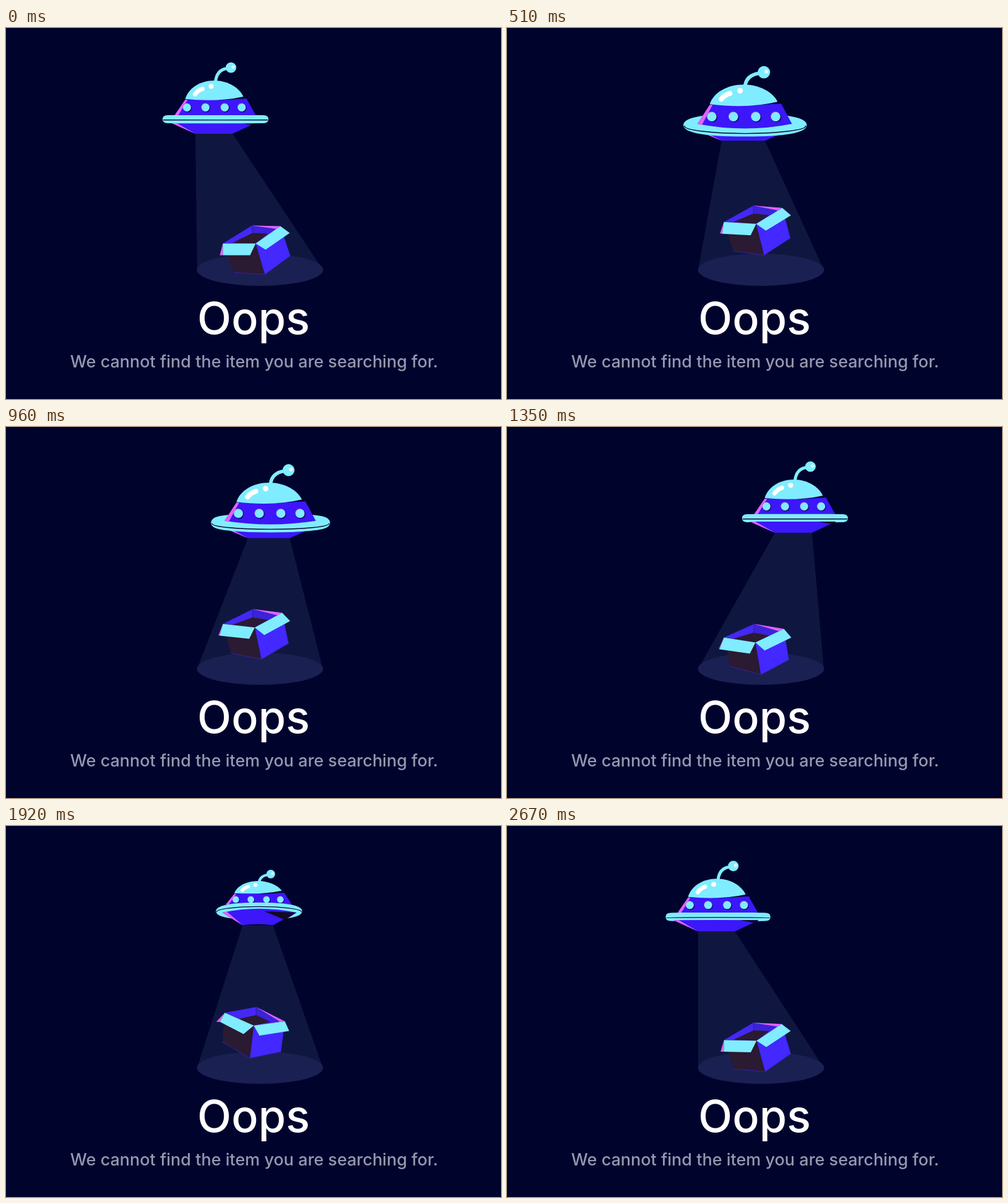
An HTML page with a canvas that plays this animation: 800x600 px, repeating every 2700 ms.

```html
<!DOCTYPE html>
<html lang="en">
<head>
<meta charset="utf-8">
<title>Oops</title>
<style>
  html, body { margin: 0; height: 100%; overflow: hidden; background: #00042d; }
  canvas { position: absolute; left: 0; top: 0; }
  h1, p {
    position: absolute; left: 0; width: 800px; margin: 0; text-align: center;
    white-space: nowrap; line-height: 1; font-family: Inter, sans-serif; font-weight: 500;
  }
  h1 { top: 433px; font-size: 72px; color: #fff; }
  p { top: 526px; left: 1px; font-size: 27px; color: #9698b0; }
</style>
</head>
<body>
<canvas width="800" height="600"></canvas>
<h1>Oops</h1>
<p>We cannot find the item you are searching for.</p>
<script>
const ctx = document.querySelector('canvas').getContext('2d');
const LOOP = 2700, QUARTER = LOOP / 4;
const CYAN = '#80ecff', BLUE = '#3b17fa', PINK = '#e063f6', INK = '#05062c';
const BROWN = '#2a1a32', SHADE = '#120a26';

// Box corners relative to the near top corner, in three poses.
const POSES = {
  bottom:    [[15, 50], [9, 52], [-9, 53]],
  rightFoot: [[56, 20], [54, 28], [42, 45]],
  leftFoot:  [[-35, 47], [-40, 39], [-53, 24]],
  back:      [[-6, -29], [-2, -30], [5, -30]],
  left:      [[-53, 0], [-51, -8], [-46, -23]],
  right:     [[40, -28], [46, -22], [51, -4]],
  flapR1:    [[55, -17], [58, -8], [57, 12]],
  flapR2:    [[16, 10], [15, 13], [8, 17]],
  flapL1:    [[-9, 19], [-9, 18], [-18, 13]],
  flapL2:    [[-53, 19], [-58, 11], [-54, -9]],
  flapTip:   [[-58, 19], [-59, 10], [-61, -9]],
  floorL:    [[-38, -1], [-36, -6], [-25, -11]],
  floorB:    [[-5, -17], [-3, -16], [5, -17]],
  floorR:    [[20, -16], [23, -11], [28, -5]]
};

const lerp = (a, b, k) => a + (b - a) * k;
const mix = (a, b, k) => [lerp(a[0], b[0], k), lerp(a[1], b[1], k)];

// Linear interpolation through evenly spaced keys that wrap around.
function keyed(t, keys) {
  const q = t / QUARTER, i = Math.floor(q) % 4;
  return lerp(keys[i], keys[(i + 1) % 4], q % 1);
}

function shape(color, path) {
  ctx.fillStyle = color;
  ctx.fill(new Path2D(path));
}

function poly(color, ...points) {
  shape(color, 'M' + points.join('L') + 'Z');
}

function line(color, width, path) {
  ctx.strokeStyle = color;
  ctx.lineWidth = width;
  ctx.stroke(new Path2D(path));
}

function dot(color, x, y, r) {
  ctx.fillStyle = color;
  ctx.beginPath();
  ctx.arc(x, y, r, 0, 7);
  ctx.fill();
}

function drawBeam({ X, hullY }) {
  poly('#0f1740', [X(-32.5), hullY], [X(27.5), hullY], [512, 391], [309, 391]);
  ctx.fillStyle = '#1a2051';
  ctx.beginPath();
  ctx.ellipse(410.5, 391, 102, 26, 0, 0, 7);
  ctx.fill();
}

function drawBox(t) {
  const x = keyed(t, [403.5, 402.5, 401.5, 400.3]), y = keyed(t, [348.5, 306.5, 348.5, 318]);
  const c = {}, near = [0, 0];
  for (const [name, [a, b, d]] of Object.entries(POSES)) {
    c[name] = t < 2 * QUARTER ? mix(a, b, t / (2 * QUARTER))
      : t < 3 * QUARTER ? mix(b, d, t / QUARTER - 2) : mix(d, a, t / QUARTER - 3);
  }
  ctx.save();
  ctx.translate(x, y);
  poly('#4428f4', c.left, c.back, c.right, near);
  poly('#3c22da', c.back, c.right, c.floorR, c.floorB);
  poly(BROWN, near, c.floorL, c.floorB, c.floorR);
  line('#2c1a9c', 1, `M${c.back}L${c.floorB}`);
  poly(PINK, c.back, c.right, mix(c.right, near, .45), mix(c.right, c.floorR, .35));
  poly(BROWN, near, c.bottom, c.leftFoot, c.left);
  poly('#4328ff', near, c.bottom, c.rightFoot, c.right);
  line('#3a20a8', 1, `M${c.leftFoot}L${c.bottom}L${c.rightFoot}`);
  poly(PINK, c.left, c.flapTip, c.flapL2);
  poly(CYAN, c.left, near, c.flapL1, c.flapL2);
  poly(CYAN, near, c.right, c.flapR1, c.flapR2);
  ctx.restore();
}

// tilt runs from 1 (near, seen from above) to -1 (far, seen from below).
function ufoPose(t) {
  const tilt = keyed(t, [0, 1, 0, -1]);
  const cx = keyed(t, [338.5, 399.6, 465.5, 398.6]);
  const s = 1 + .219 * tilt;
  const V = (side, near, far) => lerp(side, tilt > 0 ? near : far, Math.abs(tilt));
  return { tilt, s, V, X: x => cx + x * s, hullY: V(171, 186, 158.5) };
}

function drawHull({ X, V, hullY }) {
  const y = V(153, 166, 137.6), arc = V(153, 166, 123), right = X(V(66, 66, 76));
  const foot = V(hullY, hullY, hullY - 4);
  shape(BLUE, `M${X(-73)} ${y}Q${X(0)} ${arc} ${right} ${y}L${X(27.5)} ${hullY}
    Q${X(-2)} ${foot} ${X(-32.5)} ${hullY}Z`);
  poly(PINK, [X(-73), y], [X(-64), V(153, 166, 135.5)], [X(-32.5), hullY]);
  poly(SHADE, [X(V(37, 10, 5)), V(153, 172, 135)], [right, y],
    [X(V(60, 45, 50)), V(157, 178, 151)]);
}

function drawRim({ X, V, s, tilt }) {
  const y = V(147.5, 160, 136);
  ctx.beginPath();
  ctx.ellipse(X(0), y, 79 * s, V(.2, 14.5, 10.3), 0, 0, 2 * Math.PI);
  ctx.closePath();
  ctx.fillStyle = ctx.strokeStyle = CYAN;
  ctx.lineWidth = 13 * s;
  ctx.fill();
  ctx.stroke();
  ctx.beginPath();
  ctx.ellipse(X(0), y + 1.3 * s, 84 * s, V(0, 16, 10), 0, 0, Math.PI, tilt < 0);
  ctx.strokeStyle = INK;
  ctx.lineWidth = 1.4;
  ctx.stroke();
}

function drawBody({ X, V, s }) {
  const top = V(116, 127, 108.5), low = V(141, 159.5, 124.5), arc = V(141, 179.5, 124.5);
  shape(BLUE, `M${X(-49)} ${top}L${X(50)} ${top - 2}L${X(65)} ${low}
    Q${X(0)} ${arc} ${X(-66)} ${low}Z`);
  poly(PINK, [X(-49), top], [X(-45), top], [X(-60), lerp(low, arc, .15)], [X(-66), low]);
  const y = V(128.5, 148.3, 117.3);
  for (const x of [-46, -16, 15, 42.5]) {
    dot('#150a5c', X(x + 1), y + s, 6.6 * s);
    dot('#c05cf0', X(x - .6), y - .5 * s, 6.5 * s);
    dot(CYAN, X(x), y, 6.4 * s);
  }
}

function drawDome({ X, V, s }) {
  const base = V(116, 127, 108.5), top = V(85, 93.7, 89.7);
  const ballX = X(V(25, 26.5, 23)), ballY = V(64, 74, 80.3);
  const shoulder = lerp(base, top, .6);
  line(CYAN, 5 * s, `M${X(0)} ${top + 2}Q${X(2)} ${ballY + 4 * s} ${ballX - 7 * s} ${ballY + 1.5 * s}`);
  dot(CYAN, ballX, ballY, 8.6 * s);
  dot('#d8faff', ballX + 3.5 * s, ballY - s, 2.8 * s);
  poly(INK, [X(0), base + 1], [X(50), base - 2], [X(49), base - 5], [X(44), base - 6]);
  shape(CYAN, `M${X(-49)} ${base - 1}C${X(-44)} ${shoulder} ${X(-25)} ${top} ${X(-2)} ${top}
    C${X(21)} ${top} ${X(39)} ${shoulder} ${X(45)} ${base - 5}Q${X(5)} ${base + V(4, 7, 1)} ${X(-49)} ${base - 1}Z`);
  const shine = k => lerp(top, base, k);
  line('#fff', 7 * s, `M${X(-33)} ${shine(.72)}Q${X(-29)} ${shine(.52)} ${X(-21)} ${shine(.43)}`);
  dot('#fff', X(-7), shine(.3), 4 * s);
}

function draw(t) {
  const ufo = ufoPose(t);
  ctx.clearRect(0, 0, 800, 600);
  ctx.lineCap = ctx.lineJoin = 'round';
  drawBeam(ufo);
  drawBox(t);
  const layers = ufo.tilt < 0 ? [drawBody, drawDome, drawRim, drawHull]
    : [drawHull, drawRim, drawBody, drawDome];
  layers.forEach(layer => layer(ufo));
}

function frame() {
  draw(performance.now() % LOOP);
  requestAnimationFrame(frame);
}
frame();
</script>
</body>
</html>
```
